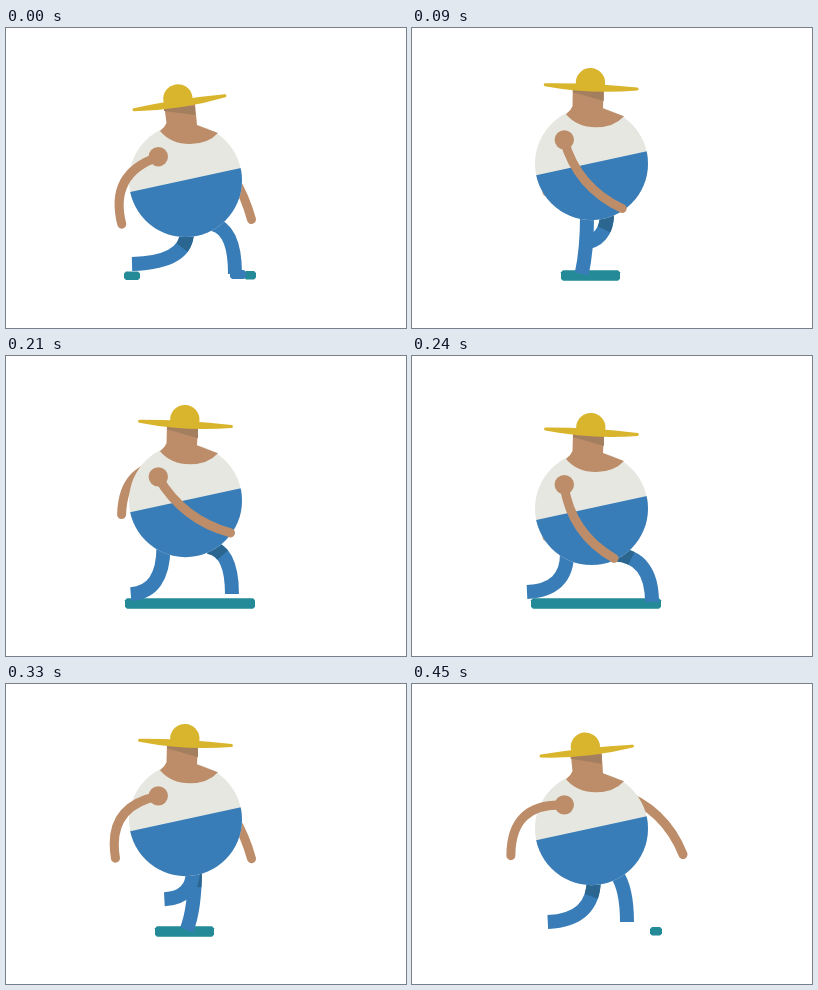
Animation of 400 by 300 pixels, one loop 480 ms. Source, as an HTML page:

```html
<!DOCTYPE html>
<html lang="en">
<head>
<meta charset="utf-8">
<title>Walking man</title>
<style>
  html, body { margin: 0; width: 100%; height: 100%; overflow: hidden; background: #fff; }
  svg { display: block; width: 100vw; height: 100vh; }
  .limb { fill: none; stroke-linejoin: round; }
  .arm { stroke: #bc8d68; stroke-width: 9; stroke-linecap: round; }
  .leg { stroke: #397db8; stroke-width: 14; }
  .shade { stroke: #2b6690; stroke-width: 14; stroke-dasharray: 17 400; }
  .skin { fill: #bc8d68; }
  .hat { fill: #d9b52d; stroke: #d9b52d; stroke-width: 3; stroke-linejoin: round; }
</style>
</head>
<body>
<svg viewBox="0 0 400 300">
  <defs><clipPath id="belly"><circle cx="179.5" cy="152.5" r="56.5"/></clipPath></defs>
  <path id="ground" fill="#248a97"/>
  <path id="shoe" fill="#397db8"/>
  <path id="splash" fill="#2ea1b6" d="M172 243Q190 241 197 239Q200 233 206 233Q215 235 215 243Z"/>
  <g class="bob"><path id="farArm" class="limb arm"/></g>
  <path id="farLeg" class="limb leg"/>
  <path id="farShade" class="limb shade"/>
  <path id="nearLeg" class="limb leg"/>
  <g class="bob">
    <g clip-path="url(#belly)">
      <path fill="#e6e7e0" d="M120 90H240V220H120Z"/>
      <path fill="#397db8" d="M120 165L240 139V220H120Z"/>
    </g>
    <path id="neck" class="skin"/>
    <path id="neckShade" fill="#a47f5f"/>
    <g id="hat" class="hat">
      <path d="M-46 -.5Q0 -3 46 0Q0 6 -46 -.5Z"/>
      <path stroke="none" d="M-15.500 1V-6A14.700 14.700 0 0 1 13.700 -6V1Z"/>
    </g>
    <path id="nearArm" class="limb arm"/>
    <circle class="skin" cx="152.300" cy="128.700" r="9.700"/>
  </g>
</svg>
<script>
const LOOP = 480, STEP = 30, COUNT = LOOP / STEP, TURN = 2 * Math.PI / COUNT;
const { sin, cos, abs, sign, max, min, sqrt, PI } = Math;
const el = id => document.getElementById(id);
const set = (id, d) => el(id).setAttribute('d', d);
const bobs = document.querySelectorAll('.bob');

const curve = (x, y, cx, cy, ex, ey) => `M${x} ${y}Q${cx} ${cy} ${ex} ${ey}`;
const bar = (a, b, y = 242.3, h = 10.5) =>
  `M${a + 2} ${y}H${b - 2}l2 2v${h - 4}l-2 2H${a + 2}l-2 -2v${4 - h}Z`;

// Stride from 1 (foot in front) to -1 (behind), lingering under the body.
const stride = k => {
  const c = cos(k * TURN);
  return sign(c) * abs(c) ** 3;
};

// The elbow bends sideways from the line between shoulder and hand.
function arm(x, y, angle, bend, stiffness) {
  const s = sin(angle), c = cos(angle);
  const reach = 82 + 12 * s, out = bend - stiffness * s;
  return curve(x, y,
    x + reach / 2 * s - out * c, y + reach / 2 * c + out * s,
    x + reach * s, y + reach * c);
}

function leg(k, rise, base, swing, sway, foot) {
  const s = sin(k * TURN), step = stride(k), lift = max(0, -s) ** 1.5;
  const hipX = base + swing * step - sway * s;
  const hipY = 147.5 - rise + sqrt(56 ** 2 - (hipX - 179.5) ** 2);
  const x = foot + 57 * step - 6 * s - 18 * lift;
  const y = 246 - 34 * lift - 10 * max(0, -step);
  const knee = max(-1, min(1, (x - hipX) / 25));
  return curve(hipX, hipY,
    max(hipX, x), (hipY + y) / 2 - (y - hipY) * .45 * knee, x, y);
}

function draw(k) {
  const rise = 18 * (1 - ((k % 8 - 4) / 4) ** 2);
  bobs.forEach(g => g.setAttribute('transform', `translate(0 ${-rise})`));

  const nearSwing = (3 + 62 * cos((k - 5.35) * TURN)) * PI / 180;
  const farSwing = -56 * cos((k - 5.5) * TURN) * PI / 180;
  set('nearArm', arm(152, 129, nearSwing, 29, 13));
  set('farArm', arm(187 + 25 * sin(farSwing), 116, farSwing, 8, 40));

  const far = leg(k + 8, rise, 192, 11, 4, 183);
  set('nearLeg', leg(k, rise, 181, 26, 8, 172));
  set('farLeg', far);
  set('farShade', far);

  const nod = max(0, stride(k));
  const left = 161 - 3 * nod, right = 192 - 3 * nod;
  set('neck', `M${left} 76L160.500 95Q159 99 154 103Q165 116 184 116Q202 116 212 105Q201 101 191 97L${right} 76Z`);
  set('neckShade', `M${left} 78H${right}V${90 - 3 * nod}L${left} ${81 + 2 * nod}Z`);
  el('hat').setAttribute('transform',
    `translate(${179.5 - 6 * nod} ${76 - nod}) rotate(${3 - 12 * nod})`);

  // Shoes smear along the ground, except while the near foot lands.
  const c = cos(k * TURN), planted = sin(k * TURN) >= 0, landing = c > .9;
  const heel = landing && planted;
  set('ground', landing ? bar(238, 250, 243, 8.5) + (heel ? bar(118, 134, 243.500, 8.5) : '')
    : abs(c) > .75 ? bar(119, 249) : bar(149, 208));
  set('shoe', heel ? bar(224, 240, 242, 9) : '');
  el('splash').style.display = c < -.9 && !planted ? '' : 'none';
}

const start = performance.now();
let last = -1;
function tick() {
  const k = Math.floor((performance.now() - start) % LOOP / STEP);
  if (k !== last) draw(last = k);
  requestAnimationFrame(tick);
}
tick();
</script>
</body>
</html>
```
